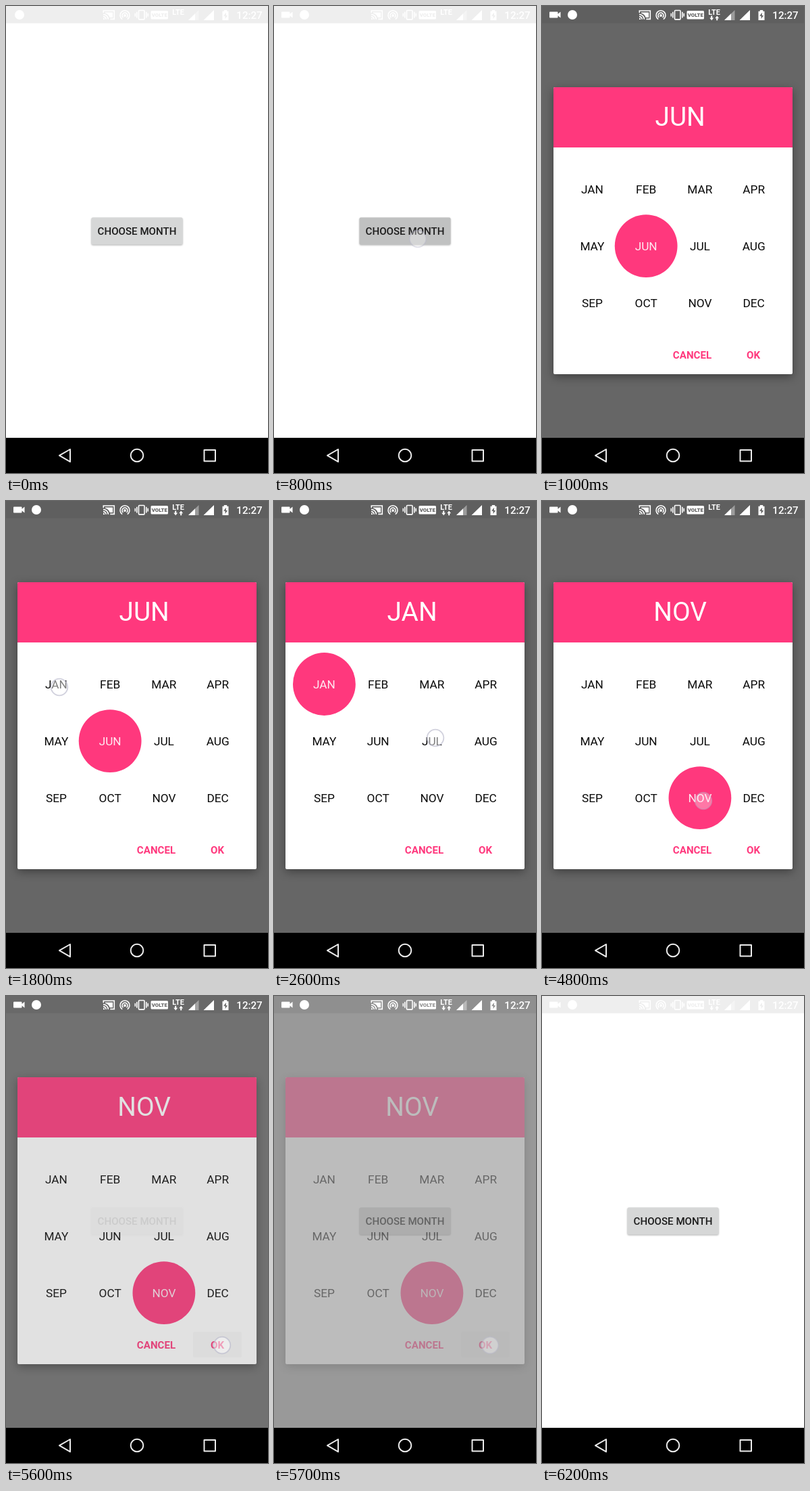
Animation of 388x690 px, one loop 6300 ms. Source, as an HTML page:

```html
<!DOCTYPE html>
<html lang="en">
<head>
<meta charset="utf-8">
<title>Month picker</title>
<style>
  html, body { margin: 0; width: 100%; height: 100%; overflow: hidden; background: #fff; }
  svg { display: block; width: 100vw; height: 100vh; --pink: #ff387d; }
  text { font-family: Roboto, sans-serif; text-anchor: middle; }
  .label { font-size: 15.1px; font-weight: 500; }
  .month { font-size: 17.25px; fill: #0a0a0a; }
  .month.on { fill: #ffe9f1; }
  .title { font-size: 38.8px; fill: #fff; }
  .line { fill: none; stroke: #fff; stroke-width: 1.6; }
  .nav { fill: none; stroke: #ececec; stroke-width: 2; stroke-linejoin: round; }
  .cut { fill: var(--bar); }
  .panel { filter: drop-shadow(0 4px 7px rgba(0,0,0,.38)); }
  #button { filter: drop-shadow(0 1px 1px rgba(0,0,0,.3)); }
</style>
</head>
<body>
<svg id="stage" viewBox="0 0 388 690" preserveAspectRatio="none">
  <rect width="388" height="690" fill="#fff"/>
  <rect width="388" height="25.5" fill="#eee"/>

  <rect id="button" x="126.5" y="312.5" width="135" height="40" rx="2" fill="#d6d7d7"/>
  <rect id="press" x="126.5" y="312.5" width="135" height="40" rx="2" fill="#000"/>
  <text class="label" x="194" y="338" fill="#1d1d1d">CHOOSE MONTH</text>

  <rect id="dim" width="388" height="690"/>

  <g id="dialog">
    <rect class="panel" x="17" y="120" width="354" height="424" rx="2" fill="#fff"/>
    <path d="M17 209V122q0-2 2-2H369q2 0 2 2V209z" fill="var(--pink)"/>
    <text id="title" class="title" x="204.6" y="177.3"></text>
    <circle id="dot" r="46.4" fill="var(--pink)"/>
    <g id="months"></g>
    <rect id="okPress" x="277" y="496" width="72" height="38" rx="2" fill="#000"/>
    <g class="label" fill="var(--pink)" style="font-weight:600">
      <text x="222.5" y="520.6">CANCEL</text>
      <text x="313" y="520.6">OK</text>
    </g>
  </g>

  <g id="status" fill="#fff">
    <path id="camera" d="M12 8.5h10.5q1 0 1 1v2.3l4-3.3v9l-4-3.3v2.3q0 1-1 1H12q-1 0-1-1v-7q0-1 1-1z"/>
    <circle id="badge" cy="13" r="7"/>
    <!-- cast -->
    <path class="line" d="M144.3 10V7h16v12.4h-6"/>
    <path class="line" d="M144 12.4a7.5 7.5 0 0 1 7.4 7.4M144 15.6a4.2 4.2 0 0 1 4.2 4.2"/>
    <path d="M144 17.8a2.3 2.3 0 0 1 2.3 2.3H144zM147 9.4h11v7.6h-4.3q-2-5.2-6.7-6.2z"/>
    <!-- hotspot -->
    <circle cx="176" cy="14" r="1.9"/>
    <path class="line" d="M172.2 19.6a7 7 0 1 1 7.6 0M173.4 17a4 4 0 1 1 5.2 0"/>
    <!-- vibrate -->
    <rect class="line" x="196.5" y="6.5" width="8.5" height="13.4" rx="1"/>
    <path class="line" d="M193.8 8.8v8.6M191.3 10.8v4.6M207.8 8.8v8.6M210.2 10.8v4.6"/>
    <!-- call and data -->
    <rect x="214.5" y="7" width="25.5" height="12.5" rx="1.5"/>
    <text class="cut" x="227.3" y="16.2" font-size="7.8" font-weight="800">VOLTE</text>
    <text x="255" y="12.8" font-size="10.8" font-weight="600">LTE</text>
    <path id="arrows" d="M250.2 14.5h2v3h2l-3 3.8-3-3.8h2zM258.2 21.3h2v-3h2l-3-3.8-3 3.8h2z"/>
    <!-- signal and battery -->
    <path d="M270 21L285.5 6v15z" opacity=".38"/>
    <path d="M270 21L280 11.3V21zM292.5 21L308 6v15z"/>
    <path d="M320.5 7.7h2.3V6h4.4v1.7h2.3V21h-9z"/>
    <path class="cut" d="M325.8 9.7l-3.6 5h2.4v4.2l3.4-5h-2.2z"/>
    <text class="label" x="360.5" y="18.6">12:27</text>
  </g>

  <rect y="638" width="388" height="52"/>
  <path class="nav" d="M95 655v18.4L79 664.2z"/>
  <circle class="nav" cx="194" cy="664" r="9.3"/>
  <rect class="nav" x="293.5" y="656" width="16.5" height="16.5"/>

  <circle id="touch" r="12.3" fill="#fff" fill-opacity=".48" stroke="#b9b9cb" stroke-opacity=".65" stroke-width="1.8"/>
</svg>
<script>
  const LOOP = 6300, STEP = 100;
  const NAMES = 'JAN FEB MAR APR MAY JUN JUL AUG SEP OCT NOV DEC'.split(' ');
  const $ = id => document.getElementById(id);
  const set = (id, attrs) => {
    for (const key in attrs) $(id).setAttribute(key, attrs[key]);
  };

  // Each row: start time, then the values held from there on.
  const PICKS = [[0, 5], [1900, 0], [3000, 6], [4000, 8], [4700, 10]];
  const FADES = [ // dim, dialog opacity
    [0, 0, 0], [900, .38, .6], [1000, .6, 1], [5600, .557, .79],
    [5700, .4, .35], [5800, .16, .05], [5900, 0, 0]
  ];
  const ARROWS = [[0, 0], [900, 1], [4600, 0], [5600, 1]];
  const TOUCHES = [ // down, up, x, y
    [500, 700, 213, 344], [1700, 1800, 79, 275], [2500, 2900, 239, 350],
    [3800, 3900, 78, 443], [4500, 4700, 239, 443], [5200, 5600, 320, 516]
  ];
  const at = (rows, t) => rows.filter(row => row[0] <= t).pop();
  const cell = i => [74.4 + 79.75 * (i % 4), 270.5 + 84.1 * Math.floor(i / 4)];

  const labels = NAMES.map((name, i) => {
    const label = document.createElementNS('http://www.w3.org/2000/svg', 'text');
    const [x, y] = cell(i);
    label.setAttribute('x', x);
    label.setAttribute('y', y + 6);
    label.textContent = name;
    $('months').append(label);
    return label;
  });

  function draw(t) {
    const [, pick] = at(PICKS, t);
    const [, dim, opacity] = at(FADES, t);
    const [cx, cy] = cell(pick);
    $('title').textContent = NAMES[pick];
    labels.forEach((label, i) => label.setAttribute('class', i === pick ? 'month on' : 'month'));
    set('dot', { cx, cy });
    set('dim', { opacity: dim });
    set('dialog', { opacity });
    const shade = Math.round(238 * (1 - dim));
    $('stage').style.setProperty('--bar', `rgb(${shade},${shade},${shade})`);

    const recording = t >= 400;
    set('camera', { opacity: recording ? 1 : 0 });
    set('badge', { cx: recording ? 45 : 20 });
    set('arrows', { opacity: at(ARROWS, t)[1] });
    set('press', { opacity: t >= 600 && t < 900 ? .1 : 0 });
    set('okPress', { opacity: t >= 5600 ? .025 : 0 });

    const [, up, x, y] = at(TOUCHES, t) || [0, -STEP * 4, 0, 0];
    set('touch', { cx: x, cy: y, opacity: Math.max(0, Math.min(1, 1 - (t - up) / 300)) });
  }

  const start = performance.now();
  function tick() {
    const t = (performance.now() - start) % LOOP;
    draw(Math.floor(t / STEP) * STEP);
    requestAnimationFrame(tick);
  }
  tick();
</script>
</body>
</html>
```
